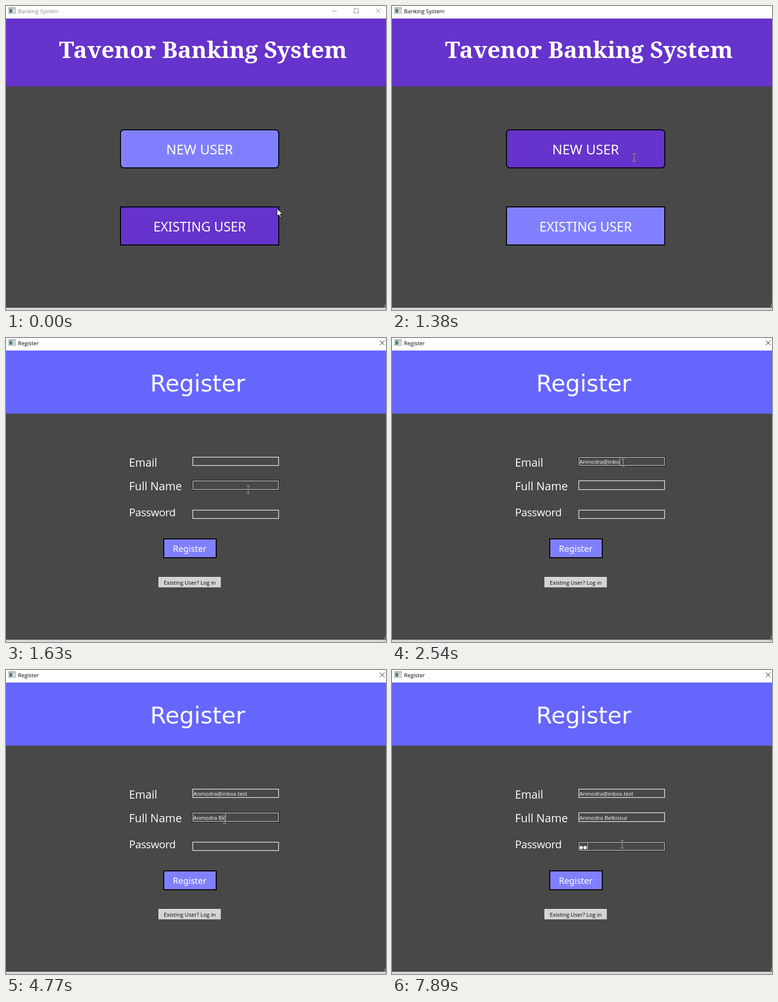
Animation, 790 px wide and 631 px high, one loop 8 s. Source, as an HTML page with a canvas:

```html
<!DOCTYPE html>
<html lang="en">
<head>
<meta charset="utf-8">
<title>Banking System</title>
<style>
html, body { margin: 0; width: 100%; height: 100%; overflow: hidden; background: #484848; }
canvas { display: block; width: 790px; height: 631px; }
</style>
</head>
<body>
<canvas id="stage" width="790" height="631"></canvas>
<script>
const ctx = document.getElementById('stage').getContext('2d');
const LOOP = 8000, BLINK = 530;
const UI = '"Open Sans", sans-serif';
const CAPS = '"Noto Sans", sans-serif';
const WIDE = '"DejaVu Sans", sans-serif';
const SERIF = '"Noto Serif", serif';
const BODY = '#484848', PURPLE = '#6633cc', LILAC = '#8080ff', BLUE = '#6666ff';

const mainButtons = [
  { label: 'NEW USER', y: 256, radius: 8, size: 28 },
  { label: 'EXISTING USER', y: 416, radius: 1, size: 27 }
].map(b => ({ ...b, x: 237, w: 331, h: 81 }));

// A burst of typing ends with `total` characters shown.
const burst = (first, last, steps, total) => ({ first, last, steps, total });

const fields = [
  { label: 'Email', y: 246, h: 20, size: 23, base: 267, click: 2270,
    value: 'Anmodra@inbox.test', font: [11.4, UI], bursts: [burst(2400, 2670, 3, 18)] },
  { label: 'Full Name', y: 295, h: 21, size: 23.4, base: 316, click: 3100,
    value: 'Anmodra Belkissur', font: [11.4, UI],
    bursts: [burst(3780, 4040, 3, 4), burst(4320, 4770, 4, 10), burst(5150, 5730, 5, 17)] },
  { label: 'Password', y: 356, h: 20, size: 22.4, base: 370, spacing: -0.5, click: 6940,
    value: '●●', font: [9.1, WIDE], bursts: [burst(7700, 7890, 2, 2)] }
].map(f => ({ ...f, x: 387, w: 181 }));

const pointerStart = { x: 563, y: 420 };
const moves = [
  { first: 280, last: 950, steps: 5, x: 503, y: 314 },
  { first: 1880, last: 2270, steps: 4, x: 480, y: 258 },
  { first: 2800, last: 3200, steps: 4, x: 454, y: 310 },
  { first: 6550, last: 6940, steps: 4, x: 478, y: 361 }
];

// Share of a stepped change done at t; the first step lands at `first`, the last at `last`.
function progress(t, { first, last, steps }) {
  const done = Math.floor((t - first) / (last - first) * (steps - 1)) + 1;
  return Math.min(1, Math.max(0, done / steps));
}

function pointerAt(t) {
  let { x, y } = pointerStart;
  for (const m of moves) {
    const p = progress(t, m);
    const eased = p * (2 - p);
    x += (m.x - x) * eased;
    y += (m.y - y) * eased;
  }
  return [Math.round(x), Math.round(y)];
}

function typedCount(t, field) {
  return field.bursts.reduce((n, b) => Math.round(n + (b.total - n) * progress(t, b)), 0);
}

function caretShown(t, field) {
  if (fields.findLast(f => f.click <= t) !== field) return false;
  const times = field.bursts.filter(b => b.first <= t).map(b => Math.min(t, b.last));
  const idle = t - Math.max(field.click, ...times);
  return idle % (2 * BLINK) < BLINK;
}

const inside = (r, x, y) => x >= r.x && x < r.x + r.w && y >= r.y && y < r.y + r.h;

function rect(color, x, y, w, h) {
  ctx.fillStyle = color;
  ctx.fillRect(x, y, w, h);
}

function outline(color, x, y, w, h) {
  ctx.strokeStyle = color;
  ctx.lineWidth = 1;
  ctx.strokeRect(x + 0.5, y + 0.5, w - 1, h - 1);
}

function text(str, x, y, [size, family, weight = 400], { color = '#fff', align = 'left', spacing = 0 } = {}) {
  ctx.font = `${weight} ${size}px ${family}`;
  ctx.letterSpacing = spacing + 'px';
  ctx.textAlign = align;
  ctx.fillStyle = color;
  ctx.fillText(str, x, y);
}

const centered = (str, x, y, font, color) => text(str, x, y, font, { color, align: 'center' });

function line(color, x1, y1, x2, y2) {
  ctx.strokeStyle = color;
  ctx.lineWidth = 1;
  ctx.beginPath();
  ctx.moveTo(x1, y1);
  ctx.lineTo(x2, y2);
  ctx.stroke();
}

function cross(x, y, color) {
  line(color, x - 5, y - 5, x + 5, y + 5);
  line(color, x + 5, y - 5, x - 5, y + 5);
}

function button({ x, y, w, h, radius }, fill) {
  ctx.beginPath();
  ctx.roundRect(x + 1, y + 1, w - 2, h - 2, radius - 1);
  ctx.fillStyle = fill;
  ctx.fill();
  ctx.strokeStyle = '#000';
  ctx.lineWidth = 2;
  ctx.stroke();
}

// Drawn wider than the stage so that it still covers it when scaled down.
function drawWindow(title, titleColor, header, headerEnd) {
  rect('#fff', -20, -20, 830, 46);
  rect(header, -20, 26, 830, headerEnd - 26);
  rect(BODY, -20, headerEnd, 830, 627 - headerEnd);
  rect('#a8a8a8', -20, 626, 830, 1);
  rect('#d8d8d8', -20, 627, 830, 24);
  line('#b4b4b4', 785.5, 631, 790, 617);
  rect('#9a9a9a', 5, 3, 15, 13);
  rect('#f4f4f4', 6, 5, 13, 10);
  rect('#4c7c80', 7, 6, 6, 8);
  rect('#c3d0d6', 14, 6, 4, 8);
  text(title, 25, 15, [11.4, UI], { color: titleColor });
}

function drawMain(t, x, y) {
  const idle = t < 1220;
  drawWindow('Banking System', idle ? '#8c8c8c' : '#000', PURPLE, 167);
  if (t < 1380) {
    const color = idle ? '#888' : '#222';
    line(color, 678, 10.5, 688, 10.5);
    outline(color, 723, 5, 10, 10);
    cross(774, 10, color);
  }
  centered('Tavenor Banking System', 409.5, 108, [48, SERIF, 700]);
  for (const b of mainButtons) {
    button(b, inside(b, x, y) ? PURPLE : LILAC);
    centered(b.label, 402.5, b.y + 51.5, [b.size, CAPS, 500]);
  }
}

function drawField(f, t, hover) {
  outline(hover ? '#000' : '#707070', f.x, f.y, f.w, f.h);
  outline('#fff', f.x + 1, f.y + 1, f.w - 2, f.h - 2);
  text(f.label, 255.7, f.base, [f.size, UI], { spacing: f.spacing });

  const typed = f.value.slice(0, typedCount(t, f));
  text(typed, 389.5, f.y + f.h - 5, f.font);
  if (caretShown(t, f)) {
    rect('#d8d8d8', Math.round(390 + ctx.measureText(typed).width), f.y + 3, 1, 15);
  }
}

function drawRegister(t, x, y) {
  drawWindow('Register', '#000', BLUE, 157);
  cross(782, 10, '#111');
  centered('Register', 398.5, 111, [48, WIDE]);
  for (const f of fields) drawField(f, t, inside(f, x, y));

  button({ x: 327, y: 416, w: 111, h: 41, radius: 1 }, LILAC);
  centered('Register', 382, 444, [18, CAPS]);
  rect('#9c9c9c', 317, 496, 130, 22);
  rect('#f0f0f0', 317, 496, 129, 21);
  rect('#d4d4d4', 318, 497, 128, 20);
  centered('Existing User? Log in', 382, 512, [11.4, UI], '#000');
}

// The dialog fades and grows in over white, with the old buttons shining through.
function drawOpening(t, x, y) {
  rect('#fff', 0, 0, 790, 631);
  ctx.save();
  ctx.globalAlpha = 0.78;
  ctx.translate(5, 3.4);
  ctx.scale(0.988, 0.988);
  drawRegister(t, x, y);
  ctx.restore();
  rect('#999', 0, 0, 1, 623);

  ctx.save();
  ctx.globalAlpha = 0.06;
  for (const top of [262, 412]) rect(LILAC, 245, top, 312, 75);
  ctx.globalAlpha = 0.35;
  ctx.beginPath();
  ctx.rect(329, 416, 107, 38);
  ctx.clip();
  centered('EXISTING USER', 401, 457, [25.5, CAPS]);
  ctx.restore();
}

function drawArrow(x, y) {
  ctx.save();
  ctx.translate(x + 0.5, y + 0.5);
  const shape = new Path2D('M0 0V16L3.7 12.5 6.2 18.3 8.6 17.2 6.2 11.6 11 11.2Z');
  ctx.fillStyle = '#fff';
  ctx.fill(shape);
  ctx.strokeStyle = '#000';
  ctx.lineWidth = 1;
  ctx.stroke(shape);
  ctx.restore();
}

// The text cursor inverts what lies under it.
function drawBeam(x, y) {
  ctx.save();
  ctx.globalCompositeOperation = 'difference';
  rect('#fff', x, y - 7, 1, 15);
  for (const end of [y - 8, y + 8]) {
    rect('#fff', x - 3, end, 3, 1);
    rect('#fff', x + 1, end, 3, 1);
  }
  ctx.restore();
}

const start = performance.now();

function tick() {
  const t = (performance.now() - start) % LOOP;
  const [x, y] = pointerAt(t);
  const drawScene = t < 1500 ? drawMain : t < 1630 ? drawOpening : drawRegister;
  drawScene(t, x, y);
  const overField = t >= 1380 && fields.some(f => inside(f, x, y));
  (overField ? drawBeam : drawArrow)(x, y);
  requestAnimationFrame(tick);
}
tick();
</script>
</body>
</html>
```
